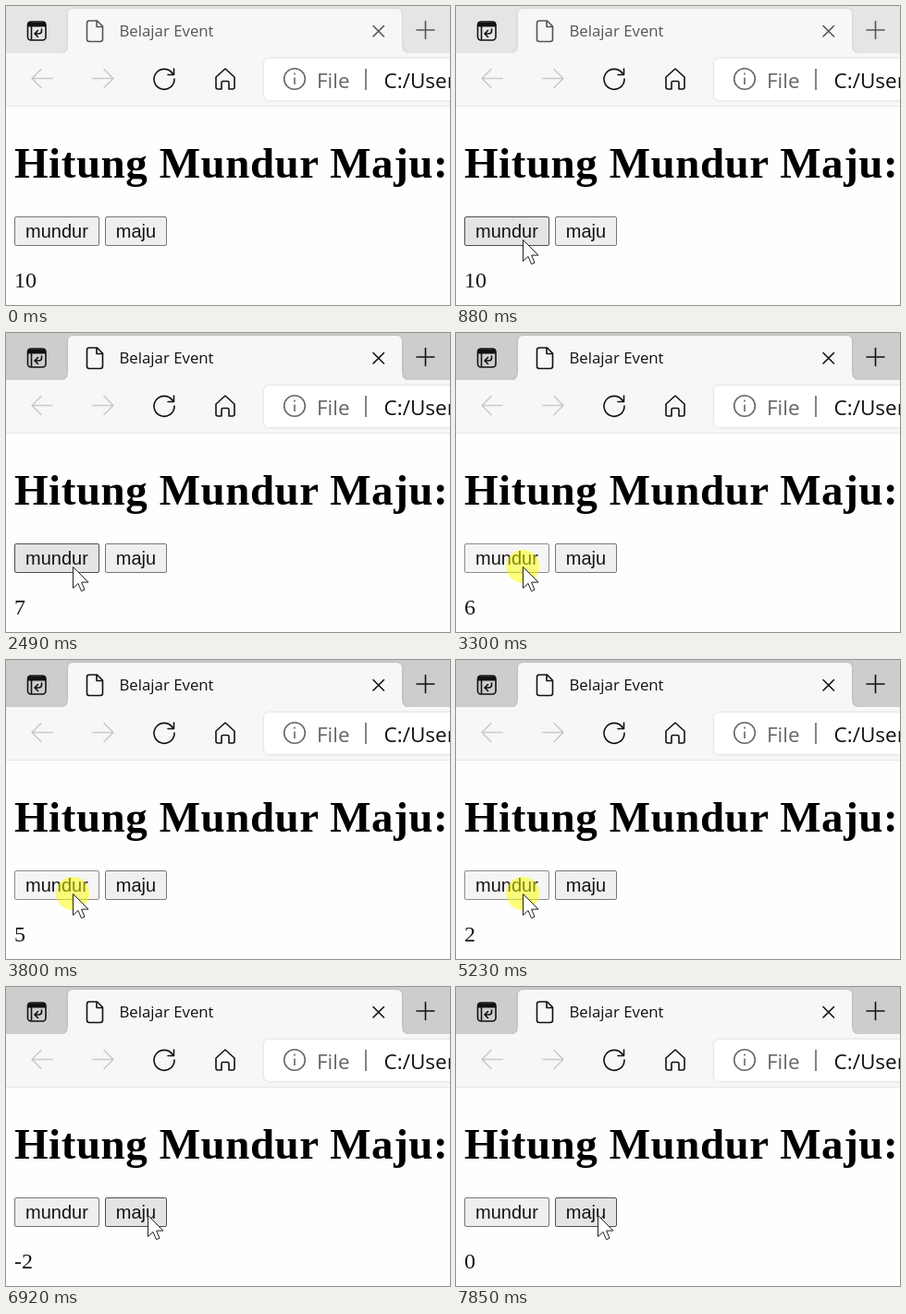
An HTML page for the animation above (8000 ms loop, 480 by 324 pixels).

```html
<!DOCTYPE html>
<html lang="id">
<head>
<meta charset="utf-8">
<title>Belajar Event</title>
<style>
html, body { margin: 0; width: 100%; height: 100%; overflow: hidden; background: #fff; }
svg { display: block; width: 480px; height: 324px; --ink: #111; }
svg.idle { --ink: #555; }
.strip { fill: #cdcdcd; }
.idle .strip { fill: #e4e6e5; }
.line { fill: none; stroke: #111; stroke-width: 1.6; stroke-linecap: round; stroke-linejoin: round; }
.tint { stroke: var(--ink); }
.faint { stroke: #c9c9c9; }
.ui { font-family: "Open Sans", "Noto Sans", sans-serif; }
.serif { font-family: "Liberation Serif", Times, serif; }
.button rect { fill: #efefef; stroke: #767676; }
.button text { font: 20px "Liberation Sans", Arial, sans-serif; fill: #141414; }
.hover rect { fill: #e4e4e4; stroke: #4f4f4f; }
.pressed rect { fill: #f5f5f5; stroke: #8d8d8d; }
#glow { fill: #ff0; opacity: .5; }
</style>
</head>
<body>
<svg id="stage" viewBox="0 0 480 324">
  <defs>
    <filter id="soft" x="-10%" y="-20%" width="120%" height="140%">
      <feDropShadow dx="0" dy="0" stdDeviation="1.6" flood-opacity=".16"/>
    </filter>
  </defs>
  <rect width="480" height="324" fill="#fefefe"/>

  <!-- tab strip and toolbar -->
  <rect class="strip" width="480" height="52"/>
  <path d="M59 52Q67 51 67 43V9Q67 3 73 3H422Q428 3 428 9V43Q428 51 436 52Z" fill="#f7f7f7" filter="url(#soft)"/>
  <rect y="51" width="480" height="57" fill="#f7f7f7"/>
  <rect y="108" width="480" height="1" fill="#e6e6e6"/>
  <rect x="279" y="57" width="220" height="45" rx="6" fill="#fff" filter="url(#soft)"/>

  <rect class="line" x="23.500" y="17" width="19.500" height="20" rx="3.500"/>
  <path d="M23.500 20H43" stroke="#111" stroke-width="5"/>
  <path class="line" d="M27.500 22V36M38.500 25V27Q38.500 30 35.500 30H31.500M34.500 26.500L31 30L34.500 33.500"/>
  <path class="line tint" d="M90 16H98.500L104.500 22V36Q104.500 38.500 102 38.500H90Q87.500 38.500 87.500 36V18.500Q87.500 16 90 16ZM98 16.500V22.500H104"/>
  <path class="line tint" d="M397 21.500L408.500 33M408.500 21.500L397 33"/>
  <path class="line tint" d="M444 26H463M453.500 16.500V35.500"/>
  <text class="ui" x="122.500" y="33" font-size="16.8" fill="var(--ink)">Belajar Event</text>

  <path class="line faint" d="M50 78.500H28M38 68.500L28 78.500L38 88.500"/>
  <path class="line faint" d="M94 78.500H116M106 68.500L116 78.500L106 88.500"/>
  <path class="line" d="M180 73A11 11 0 1 0 182 79M181.500 68V74.500H175"/>
  <path class="line" d="M227 77L237 68L247 77V88Q247 90 245 90H241V83Q241 81.500 239.500 81.500H234.500Q233 81.500 233 83V90H229Q227 90 227 88Z"/>
  <g fill="none" stroke="#666" stroke-width="1.6">
    <circle cx="312" cy="79" r="11.3"/>
    <path d="M312 77.500V85M312 72.500V74.500M389 68V91"/>
  </g>
  <text class="ui" x="336" y="89" font-size="22.500" fill="#666">File</text>
  <text class="ui" x="408.500" y="89" font-size="22.500" fill="#111">C:/Users</text>

  <!-- page -->
  <text class="serif" x="9" y="186" font-size="47" font-weight="700" letter-spacing=".55">Hitung Mundur Maju:</text>
  <g class="button" id="down">
    <rect x="9.500" y="228.500" width="91" height="31" rx="1.500"/>
    <text x="21" y="251">mundur</text>
  </g>
  <g class="button" id="up">
    <rect x="107.500" y="228.500" width="66" height="31" rx="1.500"/>
    <text x="118.800" y="251">maju</text>
  </g>
  <text class="serif" id="count" x="9" y="305" font-size="24" fill="#141414"></text>

  <circle id="glow" r="18"/>
  <path id="cursor" d="M.5 .5V23.500L6 18.400L9.500 26.700L13 25.200L9.600 17.100H17Z" fill="#fff" stroke="#222"/>
</svg>
<script>
const LOOP = 8000;
const REST = [72, 253], NEXT = [153, 247];
// [press, count change, release, step]
const clicks = [
  [1440, 1490, 1490, -1], [1940, 1990, 1990, -1], [2420, 2490, 2490, -1],
  [2920, 2920, 2920, -1], [3300, 3370, 3420, -1], [3800, 3870, 3870, -1],
  [4300, 4300, 4300, -1], [4730, 4800, 4800, -1], [5230, 5300, 5300, -1],
  [5730, 5730, 5730, -1], [6160, 6230, 6230, -1], [6660, 6720, 6720, -1],
  [7230, 7300, 7300, 1], [7800, 7850, 7850, 1]
];
const $ = id => document.getElementById(id);
const mix = (a, b, k) => a.map((v, i) => v + (b[i] - v) * k);

function pointer(t) {
  if (t < 880) {
    const k = (Math.floor((t - 290) / 65.5) + 1) / 10;
    return mix([132, 316], REST, 1 - (1 - k) ** 2);
  }
  if (t < 6780) return REST;
  if (t < 6920) return mix(REST, NEXT, t < 6850 ? .35 : .8);
  return NEXT;
}

function draw(t) {
  const [x, y] = pointer(t);
  const shown = t >= 290;
  const held = clicks.some(([press, , release]) => t >= press && t < release);
  const count = clicks.reduce((n, [, change, , step]) => t >= change ? n + step : n, 10);
  const mark = (id, left, right) => {
    const over = shown && x >= left && x < right && y >= 228 && y < 260;
    $(id).setAttribute("class", "button" + (over ? held ? " pressed" : " hover" : ""));
  };
  mark("down", 9, 101);
  mark("up", 107, 174);
  $("stage").setAttribute("class", t < 1440 ? "idle" : "");
  $("count").textContent = count;
  for (const id of ["cursor", "glow"]) $(id).setAttribute("transform", `translate(${x} ${y})`);
  $("cursor").style.display = shown ? "" : "none";
  $("glow").style.display = held ? "" : "none";
}

function tick() {
  draw(performance.now() % LOOP);
  requestAnimationFrame(tick);
}
tick();
</script>
</body>
</html>
```
